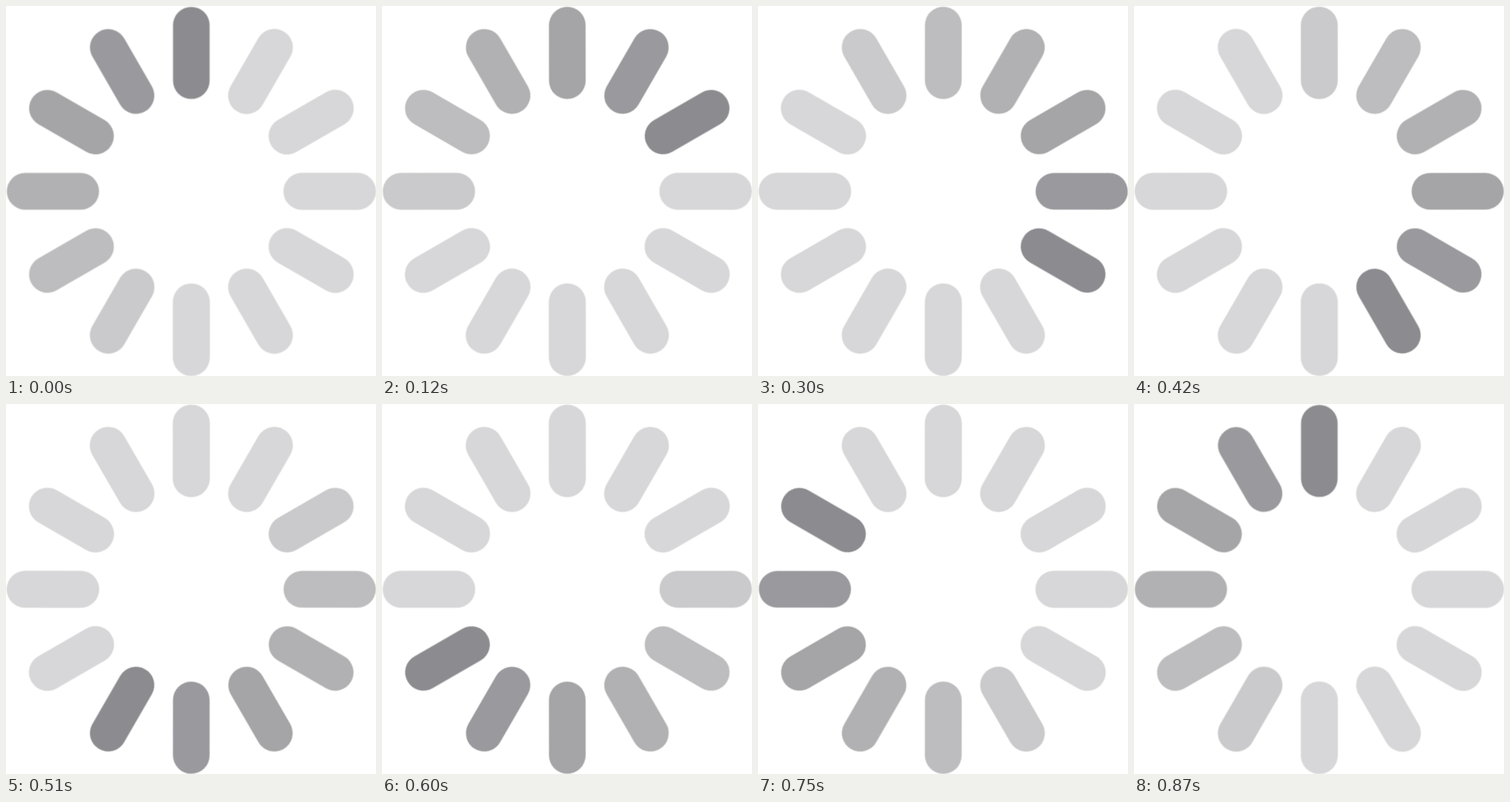
Animation of 498x498 px, one loop 0.9 s. Source, as an HTML page:

```html
<!DOCTYPE html>
<html lang="en">
<head>
<meta charset="utf-8">
<title>Loading spinner</title>
<style>
  html, body { margin: 0; width: 100%; height: 100%; overflow: hidden; background: #fff; }
  svg { display: block; width: 100%; height: 100%; }
  line { stroke-linecap: round; }
  .edge { stroke: #e6e6e4; stroke-width: 50.4; }
  .fill { stroke-width: 49; }
  /* the head advances one bar per tick, on a slightly uneven clock */
  #wheel { animation: tick 900ms step-end infinite; }
  @keyframes tick {
    0% { transform: rotate(0deg); }
    6.6667% { transform: rotate(30deg); }
    13.3333% { transform: rotate(60deg); }
    23.3333% { transform: rotate(90deg); }
    33.3333% { transform: rotate(120deg); }
    40% { transform: rotate(150deg); }
    50% { transform: rotate(180deg); }
    56.6667% { transform: rotate(210deg); }
    66.6667% { transform: rotate(240deg); }
    73.3333% { transform: rotate(270deg); }
    83.3333% { transform: rotate(300deg); }
    90% { transform: rotate(330deg); }
    96.6667%, 100% { transform: rotate(360deg); }
  }
</style>
</head>
<body>
<svg viewBox="0 0 498 498">
  <defs>
    <g id="bar">
      <line class="edge" y1="-223.6" y2="-148.9"/>
      <line class="fill" y1="-223.6" y2="-148.9"/>
    </g>
  </defs>
  <g transform="translate(249.4 249.4)">
    <g id="wheel">
      <use href="#bar" stroke="#8c8b90"/>
      <use href="#bar" stroke="#9a999e" transform="rotate(-30)"/>
      <use href="#bar" stroke="#a5a5a7" transform="rotate(-60)"/>
      <use href="#bar" stroke="#b1b1b3" transform="rotate(-90)"/>
      <use href="#bar" stroke="#bdbdbf" transform="rotate(-120)"/>
      <use href="#bar" stroke="#cacacc" transform="rotate(-150)"/>
      <g stroke="#d7d7d9">
        <use href="#bar" transform="rotate(180)"/>
        <use href="#bar" transform="rotate(150)"/>
        <use href="#bar" transform="rotate(120)"/>
        <use href="#bar" transform="rotate(90)"/>
        <use href="#bar" transform="rotate(60)"/>
        <use href="#bar" transform="rotate(30)"/>
      </g>
    </g>
  </g>
</svg>
</body>
</html>
```
